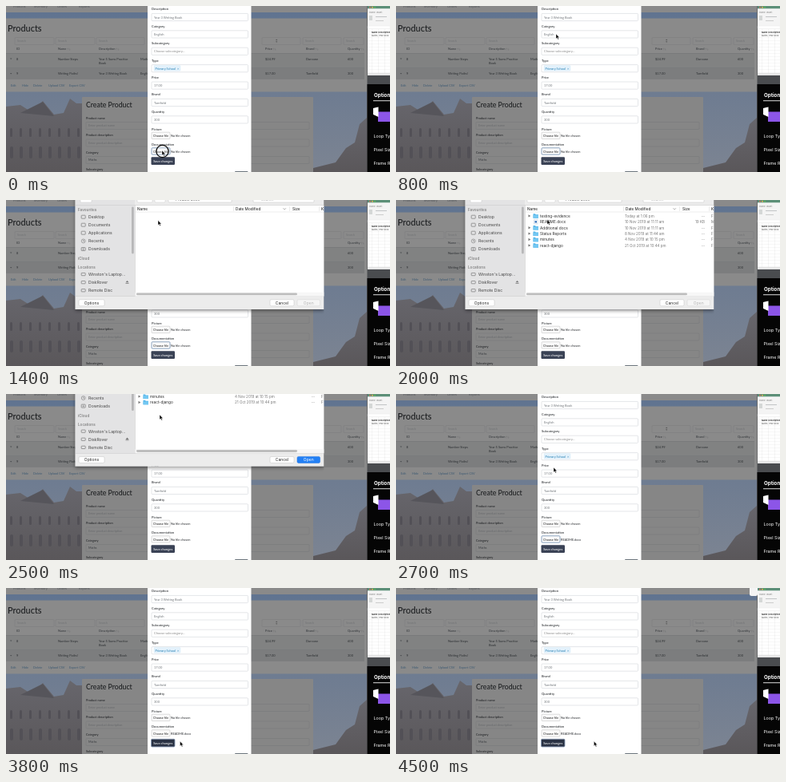
Write an HTML page that moves like this. It is 480 by 208 pixels and loops after 4600 ms.

```html
<!DOCTYPE html>
<html lang="en">
<head>
<meta charset="utf-8">
<title>Attach a document</title>
<style>
html, body { margin: 0; width: 100%; height: 100%; overflow: hidden; background: #8a8a8a; }
svg { display: block; width: 100vw; height: 100vh; }
text { white-space: pre; }
.lato { font-family: Lato, sans-serif; }
.ui { font-family: Inter, Roboto, sans-serif; }
</style>
</head>
<body>
<svg id="stage" viewBox="0 0 480 208"></svg>
<script>
const rect = (x, y, w, h, fill, extra = '') =>
  `<rect x="${x}" y="${y}" width="${w}" height="${h}" fill="${fill}" ${extra}/>`;
const path = (d, fill, extra = '') => `<path d="${d}" fill="${fill}" ${extra}/>`;
const text = (x, y, s, size, fill, extra = '') =>
  `<text x="${x}" y="${y}" font-size="${size}" fill="${fill}" ${extra}>${s}</text>`;
const group = (content, extra = '') => `<g ${extra}>${content}</g>`;
const outline = (color, r = 1, w = .5) => `stroke="${color}" stroke-width="${w}" rx="${r}"`;
const bold = 'font-weight="700"';
const medium = 'font-weight="500"';
const mid = 'text-anchor="middle"';
const page = '#8a8a8a';

function scenery() {
  let s = rect(0, 0, 451, 208, 'url(#sky)');
  s += path('M0 126L18 124L32 133L46 119L60 136L72 134L80 116L88 122H95V208H0Z', 'url(#stone)');
  s += path('M384 208V203L412 196L425 178L436 171L442 148L451 140V208Z', 'url(#stone)');
  s += path('M18 134L46 120L60 138Z', '#56555b');
  for (let x = 5; x < 92; x += 12)
    s += rect(x, 153, 3, 11, '#525056', 'rx="1.5"') + rect(x, 176, 4, 15, '#525056', 'rx="2"');
  return s;
}

function table() {
  const columns = [[13, 'ID'], [65, 'Name'], [116, 'Description'], [324, 'Price'], [375, 'Brand'], [427, 'Quantity']];
  const rows = [
    [67.5, ['8', 'Number Steps', 'Year 5 Sums Practice', '$24.99', 'Dorvane', '600'], 'Maths'],
    [86, ['9', 'Writing Paths!', 'Year 3 Writing Book', '$17.00', 'Tarnfield', '300'], 'English']
  ];
  const arrows = '<tspan fill="#686a6c" font-size="3"> ↑↓</tspan>';
  let s = rect(0, 0, 451, 8, page) + rect(0, 15.5, 451, 92, page);
  [[9, 'Products'], [35, 'Inventory'], [64, 'Orders'], [91, 'Reports']]
    .forEach(([x, label]) => s += text(x, 1.6, label, 4, '#55585c'));
  s += text(2, 32, 'Products', 10.9, '#1c1e20', medium);
  [[11, 49], [62, 49], [113, 60], [320, 48], [371, 48], [422, 25]].forEach(([x, w], i) =>
    s += rect(x, 39.5, w, 9, page, outline('#7a7b7d')) +
      text(x + 3, 45.4, i === 3 ? '' : 'Search', 3.7, '#727476'));
  s += path('M337 43l1.2-1.5 1.2 1.5zm0 1.2l1.2 1.5 1.2-1.5z', '#555');
  columns.forEach(([x, label]) => s += text(x, 55.4, label + (x > 13 ? arrows : ''), 4, '#383b3f', medium));
  s += rect(0, 59.5, 448, 17.5, '#818282') + rect(0, 77, 448, 14.5, '#7c7d7e');
  s += rect(0, 59, 448, .6, '#727476') + rect(0, 77, 448, .4, '#757779') + rect(0, 91.5, 448, .4, '#757779');
  rows.forEach(([y, cells, category]) => {
    s += path(`M5 ${y - 2}h2.4l-1.2 1.4z`, '#4b4d50') + text(168, y, category, 4, '#2c2f32');
    cells.forEach((cell, i) => s += text(columns[i][0], y, cell, 4, '#2c2f32'));
  });
  s += text(116, 73.3, 'Book', 4, '#2c2f32');
  [[6, 'Edit'], [20, 'Hide'], [34, 'Delete'], [53, 'Upload CSV'], [79, 'Export CSV']]
    .forEach(([x, label]) => s += text(x, 100.6, label, 3.9, '#3d5a73'));
  return s;
}

function createCard() {
  let s = rect(95, 114, 289, 94, '#868686', 'rx="1"') + text(100, 127, 'Create Product', 8.7, '#1c1e20', medium);
  [['Product name', 'Enter product name'], ['Product description', 'Enter product description'],
   ['Category', 'Maths'], ['Subcategory', '']].forEach(([label, value], i) => {
    const y = 141.5 + i * 21.5;
    s += text(100, y, label, 3.9, '#222427', medium) + rect(100, y + 4, 279, 9, '#868686', outline('#747678')) +
      text(103, y + 9.9, value, 3.8, i === 2 ? '#3a3d40' : '#686a6d');
  });
  return s;
}

function fileButton(y, id) {
  return rect(182, y, 23, 8.4, '#fafafa', outline('#b8b8b8', 1) + ` id="${id}"`) +
    text(193.5, y + 5.7, 'Choose file', 3.9, '#222', mid);
}

function modal() {
  const fields = [['Description', 'Year 3 Writing Book'], ['Category', 'English'], ['Subcategory', 'Choose subcategory...'],
    ['Type', ''], ['Price', '17.00'], ['Brand', 'Tarnfield'], ['Quantity', '300']];
  let s = rect(177, 0, 129.5, 208, '#fff');
  fields.forEach(([label, value], i) => {
    const y = 5.4 + i * 21.4;
    s += text(182, y, label, 4.1, '#26292d', medium) + rect(182, y + 4, 120.5, 9.2, '#fff', outline('#c9cdd2')) +
      text(185, y + 10.1, value, 4, i === 2 ? '#8c8c8c' : '#70757a');
  });
  s += rect(185, 74.6, 33, 6.7, '#e3f1fb', outline('#d2e8f6', .8, .4)) +
    text(186.5, 79.5, 'Primary School  ×', 3.9, '#2680b5');
  s += text(182, 155.6, 'Picture', 4.1, '#26292d', medium) + fileButton(158.2, 'pictureButton') +
    text(206, 163.9, 'No file chosen', 3.9, '#26292d');
  s += text(182, 175, 'Documentation', 4.1, '#26292d', medium) + fileButton(177.8, 'docButton') +
    text(206, 183.5, '', 3.9, '#26292d', 'id="docName"');
  s += rect(181.5, 189.3, 29.5, 9.7, '#3a4255', 'rx="1.2" id="saveButton"') +
    text(196.2, 195.7, 'Save changes', 4.1, '#fff', `${mid} ${medium}`);
  return s + rect(286, 206.9, 16.5, 8, '#6c757d', 'rx="1"');
}

function sidePanels() {
  let s = rect(451.5, 0, 29, 208, '#4a4c4f') + rect(452, 0, 28, 87, '#fff') +
    rect(452, 0, 28, 3.5, '#5c8f78') + rect(452, 3.5, 28, 25, '#f4f4f4');
  ['#ee6a5f', '#f5bd4f', '#61c454'].forEach((c, i) => s += `<circle cx="${455 + i * 3}" cy="1.7" r=".9" fill="${c}"/>`);
  s += text(454, 8.5, 'Home  Insert', 2.7, '#777') + rect(454, 12, 4, 6, '#d5d8d7') +
    rect(462, 13, 14, 1, '#c2c4c6') + rect(462, 18, 10, 1, '#ccc') +
    rect(452, 25, 28, 3.5, '#fff', outline('#ddd', 0, .3));
  for (let y = 31; y < 84; y += 4) s += rect(452, y, 28, .2, '#d4d4d4');
  for (let x = 457; x < 480; x += 8) s += rect(x, 29, .2, 55, '#ccc');
  s += text(457, 34.3, 'Name  Description', 2.6, '#333', bold) + text(457, 38.3, 'Maths  Year book', 2.6, '#555');
  s += rect(452, 84, 28, 3, '#e6e6e6');
  s += rect(451.5, 98, 29, 110, '#050505') + text(460, 114, 'Options', 6.2, '#fff', bold) +
    rect(459, 118.3, 21, .9, '#f5f5f5') + rect(465, 132.5, 15, 12.5, '#8c55e8') +
    path('M459 128L465.5 126.5V139L459 136Z', '#fff');
  [['Loop Type', 165], ['Pixel Size', 182], ['Frame Rate', 198.5]]
    .forEach(([label, y]) => s += text(459.5, y, label, 5.4, '#fff'));
  return group(s, 'class="ui"');
}

const folder = (x, y) => path(`M${x} ${y}h2.5l.8 1h3.2v4.5h-6.5z`, '#58b7ea') + rect(x, y + 1.8, 6.5, 3.7, '#74c8f2');

function fileRows() {
  const rows = [['testing-evidence', 'Today at 1:06 pm'], ['README.docx', '10 Nov 2019 at 11:11 am'],
    ['Additional docs', '10 Nov 2019 at 11:11 am'], ['Status Reports', '8 Nov 2019 at 11:44 am'],
    ['minutes', '4 Nov 2019 at 10:15 pm'], ['react-django', '21 Oct 2019 at 10:44 pm']];
  return rows.map(([name, date], i) => {
    const y = 21.7 + i * 7.4, isDoc = i === 1;
    let s = isDoc ? rect(162, y - 5.4, 235, 7.4, '#1764d8', 'id="selection"') : '';
    s += isDoc ? rect(172.5, y - 4.7, 4.5, 5.6, '#fff', outline('#9eb4d2', .2, .4)) + rect(173.5, y - 3, 2.5, 2.5, '#3b77bd')
      : path(`M165.5 ${y - 3.5}l2.8 1.7l-2.8 1.7z`, '#777') + folder(171.5, y - 4.5);
    const label = text(180, y, name, 4.75, '#292929') + group(
      text(286, y, date, 4.55, '#777') + text(386, y, isDoc ? '19 KB' : '--', 4.55, '#777', 'text-anchor="end"') +
      text(394, y, isDoc ? 'M' : 'F', 4.55, '#777'));
    return s + (isDoc ? group(label, 'id="docRow"') : label);
  }).join('');
}

function sheetButton(x, w, label, id) {
  return rect(x, 124.8, w, 8, '#fff', outline('#c2c2c2', 1.6, .5) + ` id="${id}"`) +
    text(x + w / 2, 130.6, label, 5, '#292929', `${mid} id="${id}Label"`);
}

function sheet() {
  const places = [['Desktop', 23], ['Documents', 33], ['Applications', 43], ['Recents', 53.2], ['Downloads', 63.3],
    ['Winston\'s Laptop...', 95.2], ['DiskRover', 105.3], ['Remote Disc', 115.4]];
  const stroke = 'stroke="#777" stroke-width=".6"';
  let s = rect(86.5, -20, 311, 157, '#ececec', 'filter="url(#shadow)"') +
    rect(87, 0, 74, 120.5, '#e3e3e4') + rect(161.5, 6.7, 236, 114, '#fff');
  s += rect(203, -6, 79, 9, '#fff', outline('#c5c5c5', 1.5)) + rect(309, -6, 76, 9, '#fff', outline('#c5c5c5', 1.5));
  s += text(212, 1.3, 'Product Docs', 4.7, '#555') + text(319, 1.3, 'Search', 4.7, '#aaa');
  [[164, 19], [186, 13], [93, 14]].forEach(([x, w]) => s += rect(x, -5, w, 8, '#fff', outline('#ccc', 1.5)));
  s += rect(87, 6.5, 310, .5, '#c7c7c7') + rect(161, 6.5, .5, 114, '#c9c9c9') + rect(87, 120.5, 310, .5, '#c7c7c7');
  [['Favourites', 14.3], ['iCloud', 75.2], ['Locations', 86.4]]
    .forEach(([label, y]) => s += text(90, y, label, 4.6, '#858585', 'font-weight="600"'));
  places.forEach(([label, y], i) => {
    s += text(103, y, label, 5.1, '#444') + (i === 3
      ? `<circle cx="96.7" cy="${y - 1.8}" r="2.4" fill="none" ${stroke}/>` + path(`M96.7 ${y - 3.3}v1.7h1.4`, 'none', stroke)
      : rect(94.2, y - 3.8, 5, i > 4 ? 3.3 : 4, 'none', outline('#777', .5, .7)));
    if (i === 4) s += path(`M96.7 ${y - 3.2}v2.4m-1-1l1 1l1-1`, 'none', stroke);
  });
  s += path('M149.5 103.3h4l-2-2.3zM149.5 104h4v.7h-4z', '#777');
  s += rect(157, 8.5, 2.8, 59, '#b7b7b8', 'rx="1.4"');
  s += rect(161.5, 14.8, 236, .4, '#d1d1d1');
  [[164, 'Name'], [287, 'Date Modified'], [358, 'Size'], [394, 'K']]
    .forEach(([x, label]) => s += text(x, 12.7, label, 4.7, '#333', medium));
  [284, 354, 391].forEach(x => s += rect(x, 8, .4, 6, '#d0d0d0'));
  s += path('M346.5 10.3l1.7 1.7l1.7-1.7', 'none', stroke);
  s += group(fileRows(), 'id="files"');
  s += rect(161.5, 115.6, 236, 4.9, '#f7f7f7') + rect(163, 116.5, 201, 2.8, '#bdbdbd', 'rx="1.4"');
  s += sheetButton(91, 32, 'Options', 'options') + sheetButton(330, 30, 'Cancel', 'cancel') + sheetButton(364, 28.5, 'Open', 'open');
  return group(s, 'id="sheet" class="ui" clip-path="url(#sheetClip)"');
}

const gradient = (id, top, bottom) => `<linearGradient id="${id}" x1="0" y1="0" x2="0" y2="1">
  <stop stop-color="${top}"/><stop offset="1" stop-color="${bottom}"/></linearGradient>`;

const stage = document.getElementById('stage');
stage.innerHTML = `<defs>${gradient('sky', '#5f7390', '#7c8492')}${gradient('stone', '#67666c', '#5a575a')}
  <filter id="shadow" x="-5%" y="-5%" width="110%" height="115%"><feDropShadow dx="0" dy="2" stdDeviation="2.2" flood-opacity=".4"/></filter>
  <clipPath id="sheetClip"><rect x="80" y="-25" width="317.5" height="175"/></clipPath></defs>` +
  group(scenery() + table() + createCard() + modal(), 'class="lato"') + sheet() + sidePanels() +
  rect(442, -4, 10, 14, '#f4f4f4', 'rx="2.5" id="notice"') +
  '<circle id="ring" r="7.6" fill="#fff" fill-opacity=".15" stroke="#111" stroke-width="1.4"/>' +
  path('M0 0V6L1.4 4.8L2.4 7L3.4 6.5L2.4 4.4H4.2Z', '#000', 'stroke="#fff" stroke-width=".4" id="cursor"');

const el = id => document.getElementById(id);
const set = (id, attrs) => Object.entries(attrs).forEach(([key, value]) => el(id).setAttribute(key, value));
const show = (id, visible) => set(id, { visibility: visible ? 'visible' : 'hidden' });

const cursorTrack = [[0, 195, 181], [100, 195, 179], [300, 196, 130], [500, 199, 55], [600, 200, 36], [800, 200, 35],
  [1100, 192, 28], [1400, 190, 25.5], [2000, 189, 24.5], [2500, 192, 26], [2700, 197, 92], [2900, 207, 175],
  [3000, 209, 191], [3700, 209, 191], [3900, 226, 193], [4100, 247, 192], [4600, 247.5, 192]];
const sheetTrack = [[800, -150], [900, -92], [1000, -24], [1100, 0], [2400, 0], [2500, -46.4], [2600, -122], [2700, -150]];

function sample(track, t) {
  const next = track.findIndex(key => key[0] > t);
  if (next === 0) return track[0].slice(1);
  if (next < 0) return track[track.length - 1].slice(1);
  const a = track[next - 1], b = track[next], k = (t - a[0]) / (b[0] - a[0]);
  return a.slice(1).map((v, i) => v + (b[i + 1] - v) * k);
}

function render(time) {
  const t = Math.floor(time % 4600 / 100) * 100;
  const within = (from, to) => t >= from && t < to;
  const [x, y] = sample(cursorTrack, t);
  const [slide] = sample(sheetTrack, t);
  const selected = within(2100, 2700);
  const focused = t < 1800 || within(2600, 3400);
  const saved = t >= 3400;

  set('cursor', { transform: `translate(${x} ${y})` });
  set('ring', { cx: x + .5, cy: y + 1 });
  show('ring', t < 100 || within(2100, 2300) || within(3300, 3500));
  set('sheet', { transform: `translate(0 ${slide})` });
  show('sheet', within(900, 2700));
  set('files', { display: t >= 1600 ? 'inline' : 'none' });
  set('selection', { 'fill-opacity': selected ? 1 : 0 });
  el('docRow').querySelectorAll('text').forEach((node, i) =>
    node.setAttribute('fill', selected ? '#fff' : i ? '#777' : '#292929'));
  set('open', { fill: selected ? '#2380f5' : '#f5f5f5', stroke: selected ? '#1b6ede' : '#d3d3d3' });
  set('openLabel', { fill: selected ? '#fff' : '#b5b5b5' });
  set('docButton', { stroke: focused ? '#7f9ab8' : '#b8b8b8', 'stroke-width': focused ? .9 : .5 });
  el('docName').textContent = t >= 2600 ? 'README.docx' : 'No file chosen';
  set('saveButton', { fill: saved ? '#2b3344' : '#3a4255', stroke: saved ? '#8b9bb5' : 'none', 'stroke-width': .9 });
  show('notice', t >= 4300);
}

const start = performance.now();
function tick() {
  render(performance.now() - start);
  requestAnimationFrame(tick);
}
render(0);
requestAnimationFrame(tick);
</script>
</body>
</html>
```
